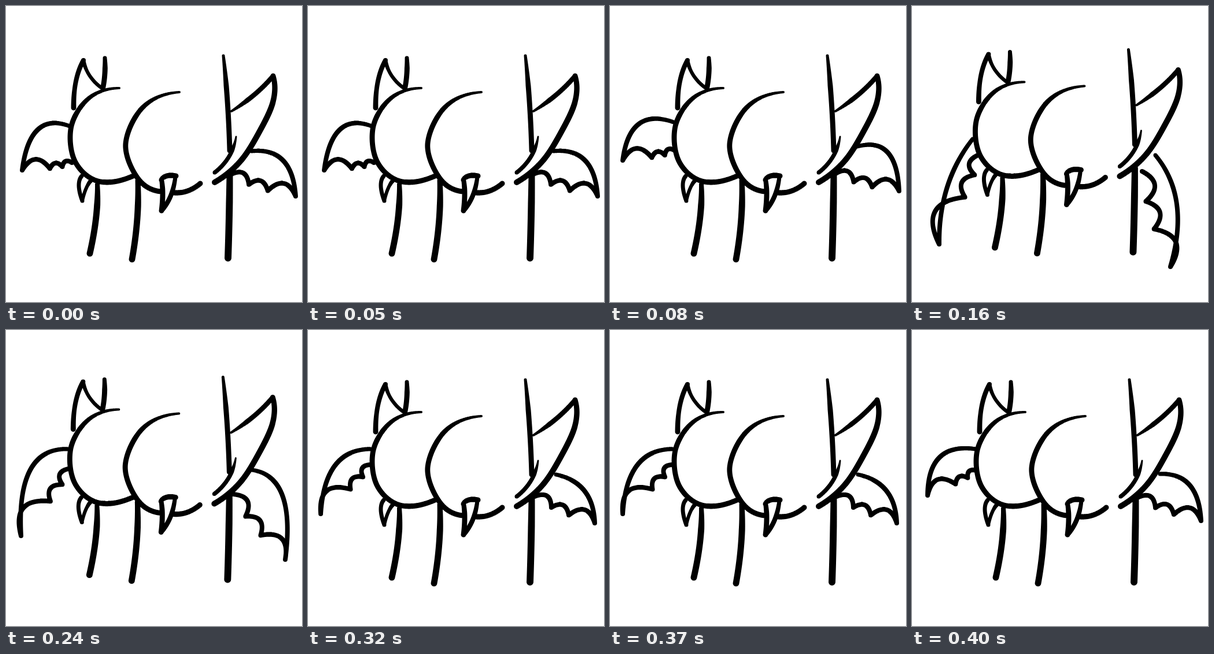
Write an HTML page with a canvas that moves like this. It is 512 px wide and 512 px high and loops after 480 ms.

```html
<!DOCTYPE html>
<html lang="en">
<head>
<meta charset="utf-8">
<title>Flapping doodle</title>
<style>
  html, body { margin: 0; height: 100%; overflow: hidden; background: #fff; }
  canvas { display: block; width: 100vw; height: 100vh; }
</style>
</head>
<body>
<canvas id="stage" width="512" height="512"></canvas>
<script>
const ctx = document.getElementById('stage').getContext('2d');
const STEP = 80;

const parse = s => s.split(' ').map(p => p.split(',').map(Number));
const beyond = (a, b, c) => a.map((v, i) => 3 * v - 3 * b[i] + c[i]);
const spline = (a, b, c, d, t) =>
  b + t / 2 * (c - a + t * (2 * a - 5 * b + 4 * c - d + t * (3 * (b - c) + d - a)));

// Inks a smooth line whose width grows from w0 to w1 over its first third.
function brush(path, w0, w1, pts) {
  const n = pts.length - 1;
  const all = [beyond(...pts), ...pts, beyond(pts[n], pts[n - 1], pts[n - 2])];
  for (let i = 0; i < n; i++) {
    const [a, b, c, d] = all.slice(i, i + 4);
    const count = Math.ceil(1.5 * Math.hypot(c[0] - b[0], c[1] - b[1]));
    for (let k = 0; k <= count; k++) {
      const t = k / count;
      const x = spline(a[0], b[0], c[0], d[0], t);
      const y = spline(a[1], b[1], c[1], d[1], t);
      const r = (w0 + (w1 - w0) * Math.min(1, 3 * (i + t) / n)) / 2;
      path.moveTo(x + r, y);
      path.arc(x, y, r, 0, 2 * Math.PI);
    }
  }
}

const body = new Path2D();
const line = (w0, w1, pts) => brush(body, w0, w1, parse(pts));

// Ear and horn
line(9, 8, '117,176 121,130 134,94');
line(7, 6, '134,94 145,121 167,143');
line(7, 9, '171,90 171,116 168,140');
// Round bellies
line(4, 9, '196,142 144,159 113,208 119,268 159,303 220,294');
line(4, 9, '300,149 238,174 207,238 228,298 268,321');
line(9, 9, '290,323 314,320 336,307');
// Fangs
line(7, 7, '131,294 126,311 132,337');
line(7, 6, '146,303 138,317 132,337');
line(7, 9, '268,301 278,294 294,294');
line(8, 9, '269,300 271,325 269,354');
line(7, 8, '293,295 285,328 269,354');
// Legs
line(8, 11, '158,308 156,364 145,428');
line(9, 11, '228,302 227,368 218,438');
line(5, 9, '376,86 383,165 387,250');
line(11, 12, '387,291 386,364 384,436');
// Blade
line(4, 8, '390,182 430,153 462,121');
line(9, 10, '462,121 462,165 438,218 405,269 361,305');
line(3, 7, '398,226 386,260 361,288');

// Per pose: root, outer bulge, tip, inner end.
const left = [
  '113,209 56,213 28,284 114,271',
  '110,201 50,204 22,267 112,250',
  '105,230 61,313 47,412 114,258',
  '107,206 42,242 26,356 108,240',
  '108,206 47,234 22,318 108,233',
  '110,206 48,220 27,286 111,243'
];
const right = [
  '425,251 479,267 501,329 388,292',
  '428,243 480,253 500,320 390,290',
  '421,258 458,343 447,451 398,286',
  '425,242 478,286 483,397 393,284',
  '429,250 478,278 496,334 392,288',
  '429,249 480,268 500,330 390,290'
];
const lift = [0, 0, 10.5, 4.5, 0, 0];

// The point at t between a and b, raised sideways by h of their distance.
function raised(a, b, t, h) {
  const dx = b[0] - a[0], dy = b[1] - a[1];
  return [a[0] + dx * t + dy * h, a[1] + dy * t - dx * h];
}

// A wing's lower edge hangs in three scallops between tip and inner end.
function wing(path, key, side, splits) {
  const [root, bulge, tip, end] = parse(key);
  brush(path, 7, 8, [root, bulge, tip]);
  const cusps = splits.map(t => raised(tip, end, t, -0.05 * side));
  let from = tip;
  for (const to of [...cusps, end]) {
    brush(path, 8, 8, [from, raised(from, to, 0.5, 0.36 * side), to]);
    from = to;
  }
}

const wings = left.map((key, i) => {
  const path = new Path2D();
  wing(path, key, 1, [0.55, 0.8]);
  wing(path, right[i], -1, [0.41, 0.7]);
  return path;
});

let shown = -1;
function draw(time) {
  const pose = Math.floor(time / STEP) % lift.length;
  if (pose === shown) return;
  shown = pose;
  ctx.clearRect(0, 0, 512, 512);
  ctx.fill(wings[pose]);
  ctx.save();
  ctx.translate(-0.15 * lift[pose], -lift[pose]);
  ctx.fill(body);
  ctx.restore();
}

const start = performance.now();
function tick() {
  draw(performance.now() - start);
  requestAnimationFrame(tick);
}
tick();
</script>
</body>
</html>
```
